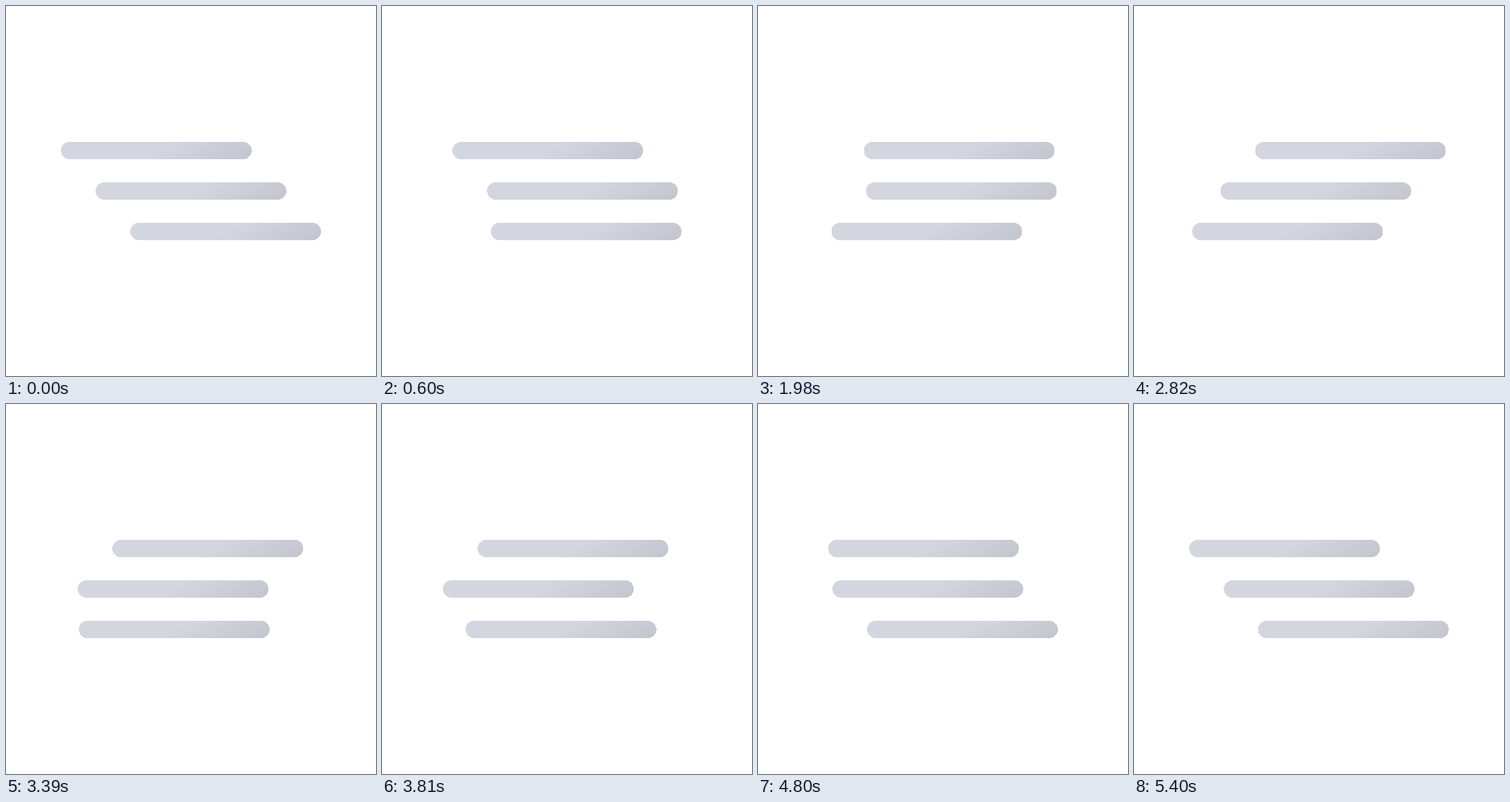
An HTML page that plays this animation: 512x512 px, repeating every 5.43 s.

```html
<!DOCTYPE html>
<html lang="en">
<head>
<meta charset="utf-8">
<title>Drifting fog</title>
<style>
  html, body { margin: 0; width: 100%; height: 100%; overflow: hidden; background: #fff; }
  svg { display: block; width: 100%; height: 100%; }
</style>
</head>
<body>
<svg viewBox="0 0 512 512">
  <defs>
    <linearGradient id="mist" gradientUnits="userSpaceOnUse" x1="134" y1="12" x2="181" y2="93.4">
      <stop offset="0" stop-color="#d3d6de"/>
      <stop offset="1" stop-color="#bec1c9"/>
    </linearGradient>
  </defs>
  <g id="bars" fill="url(#mist)" shape-rendering="crispEdges">
    <rect width="264" height="24" rx="12"/>
    <rect width="264" height="24" rx="12"/>
    <rect width="264" height="24" rx="12"/>
  </g>
</svg>
<script>
  const LOOP = 5430, STEP = 30, PERIOD = 5390;
  const LEFT = 76, TRAVEL = 96, TOP = 188, GAP = 56;
  const bars = [...document.querySelectorAll("#bars rect")];

  // Triangle wave: 0 at phase 0, 1 at phase 0.5
  const triangle = phase => 1 - Math.abs(1 - 2 * (phase % 1));

  function draw(time) {
    const t = Math.floor((time % LOOP) / STEP) * STEP;
    bars.forEach((bar, i) => {
      const x = LEFT + TRAVEL * triangle(t / PERIOD + i / 4);
      bar.setAttribute("transform", `translate(${x.toFixed(3)} ${TOP + GAP * i})`);
    });
  }

  const start = performance.now();
  function tick() {
    draw(performance.now() - start);
    requestAnimationFrame(tick);
  }
  tick();
</script>
</body>
</html>
```
